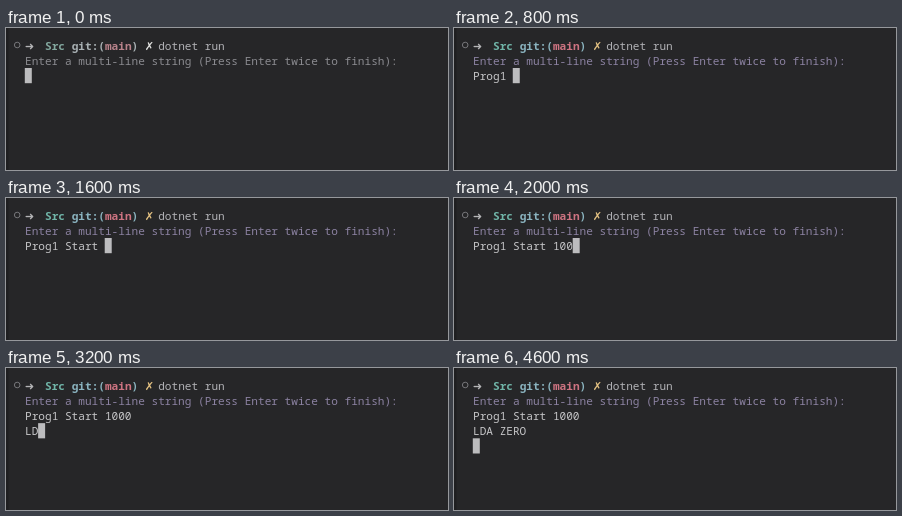
Write an HTML page that moves like this. It is 442 px wide and 142 px high and loops after 4700 ms.

```html
<!DOCTYPE html>
<html lang="en">
<head>
<meta charset="utf-8">
<title>Terminal</title>
<style>
  html, body { margin: 0; width: 100%; height: 100%; overflow: hidden; background: #262628; }
  svg { display: block; width: 442px; height: 142px; }
  text { font: 11.1px "Noto Sans Mono", "DejaVu Sans Mono", monospace; white-space: pre; fill: #c6c6c8; }
  .bold { font-weight: 700; }
  .sym { font-family: "DejaVu Sans", sans-serif; }
  svg { --dir: #70b5a8; --git: #8bb4c0; --branch: #cf7482; --mark: #e6c382; --hint: #8c82a2; }
  svg.pale { --dir: #79ab9e; --git: #a0afb4; --branch: #c97d88; --mark: #e6dbbc; --hint: #8b8794; }
  svg.grey { --dir: #83a89f; --git: #a9b1b4; --branch: #b9838b; --mark: #e4e4e2; --hint: #8b8b90; }
  .dir { fill: var(--dir); }
  .git { fill: var(--git); }
  .branch { fill: var(--branch); }
  .mark { fill: var(--mark); }
  .hint { fill: var(--hint); }
  .cmd { fill: #b2b2b6; }
</style>
</head>
<body>
<svg id="term" class="grey" viewBox="0 0 442 142">
  <rect width="442" height="142" fill="#262628"/>
  <rect width="2.5" height="142" fill="#1f1f21"/>
  <circle cx="11.2" cy="17" r="2.8" fill="none" stroke="#77777b"/>
  <text class="sym" x="18.8" y="21.5" style="fill:#b4b4b6">➜</text>
  <text class="bold" x="39" y="21.5"><tspan class="dir">Src</tspan> <tspan class="git">git:(</tspan><tspan class="branch">main</tspan><tspan class="git">)</tspan></text>
  <text class="sym mark bold" x="138.8" y="21.5">✗</text>
  <text class="cmd" x="152.2" y="21.5">dotnet run</text>
  <text class="hint" x="19" y="36.7">Enter a multi-line string (Press Enter twice to finish):</text>
  <text id="row0" x="19" y="51.8"></text>
  <text id="row1" x="19" y="67"></text>
  <rect id="cursor" width="7" height="15.2" fill="#bcbcbe"/>
</svg>
<script>
  const LOOP = 4700, LEFT = 18.8, TOP = 40, CHAR = 6.66, LINE = 15.15;
  const script = "Prog1 Start 1000\nLDA ZERO\n";
  // Time in ms at which each character of the script is typed
  const times = [
    100, 200, 300, 400, 700, 800, 1100, 1200, 1300, 1400, 1500, 1600,
    1800, 1900, 2000, 2200, 2500,
    2900, 3100, 3300, 3500, 3900, 4000, 4100, 4200, 4600
  ];
  const get = id => document.getElementById(id);
  const term = get("term"), cursor = get("cursor");
  const rows = [get("row0"), get("row1")];

  function draw(t) {
    const typed = script.slice(0, times.filter(at => at <= t).length);
    const lines = typed.split("\n");
    const last = lines.length - 1;
    rows.forEach((row, i) => {
      const text = lines[i] || "";
      if (row.textContent !== text) row.textContent = text;
    });
    cursor.setAttribute("x", LEFT + lines[last].length * CHAR);
    cursor.setAttribute("y", TOP + last * LINE);
    term.setAttribute("class", t < 300 ? "grey" : t < 800 ? "pale" : "full");
  }

  const start = performance.now();
  function tick() {
    draw((performance.now() - start) % LOOP);
    requestAnimationFrame(tick);
  }
  tick();
</script>
</body>
</html>
```
